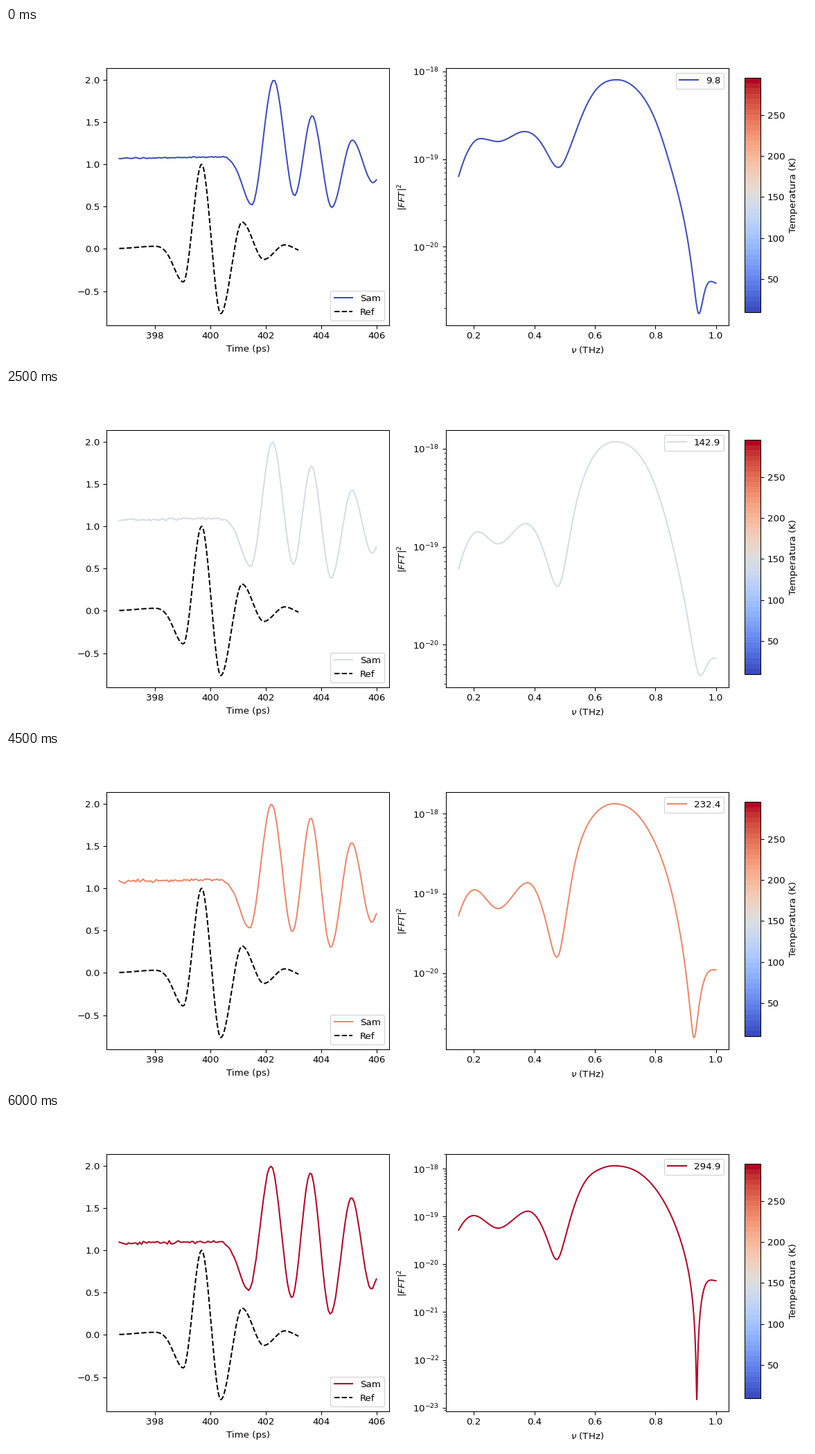
These frames come from a looping animation (1159x483 px, 6.5 s). A matplotlib script:

```python
import numpy as np
import matplotlib.pyplot as plt
from matplotlib.animation import FuncAnimation
from matplotlib.cm import ScalarMappable
from matplotlib.colors import Normalize

plt.rcParams["font.family"] = "DejaVu Sans"
DPI = 96.6
TEMPS = [9.8, 37.7, 64.9, 91.7, 117.6, 142.9, 166.2,
         188.8, 210.9, 232.4, 253.5, 274.3, 294.9]
LAST = len(TEMPS) - 1

# Sample pulse extrema: cold time, hot time, cold value, hot value
PULSE = np.array([
    (401.49, 401.38, .52, .53),
    (402.28, 402.18, 2, 2),
    (403.03, 402.93, .63, .44),
    (403.66, 403.60, 1.575, 1.914),
    (404.37, 404.32, .491, .242),
    (405.11, 405.08, 1.287, 1.624),
    (405.86, 405.80, .782, .536),
    (405.98, 405.98, .818, .66),
])

time = np.linspace(396.71, 405.98, 140)
nu = np.linspace(.15, 1, 851)


def along(i, points):
    return np.interp(i, list(points), list(points.values()))


def spline(x, y, slopes, xs):
    """Cubic spline; knots whose slope is nan get a continuous curvature."""
    x, y, slopes = (np.asarray(a, float) for a in (x, y, slopes))
    h = np.diff(x)
    d = np.diff(y) / h
    a, b = np.eye(len(x)), slopes.copy()
    for k in np.flatnonzero(np.isnan(slopes)):
        a[k, k - 1:k + 2] = 1 / h[k - 1], 2 / h[k - 1] + 2 / h[k], 1 / h[k]
        b[k] = 3 * (d[k - 1] / h[k - 1] + d[k] / h[k])
    m = np.linalg.solve(a, b)
    k = np.clip(np.searchsorted(x, xs, side="right") - 1, 0, len(h) - 1)
    s = (xs - x[k]) / h[k]
    return (y[k] + (y[k + 1] - y[k]) * s * s * (3 - 2 * s)
            + h[k] * s * (1 - s) * (m[k] * (1 - s) - m[k + 1] * s))


def extremes(i):
    """Highest and lowest log10 power, in units of 1e-18."""
    top = along(i, {0: -.094, 1: -.03, 5: .071, 9: .127, 12: .06})
    bottom = along(i, {0: -2.762, 3: -2.654, 5: -2.316, 7: -2.441,
                       9: -2.81, 10: -3.28, 11: -4.75, 12: -4.829})
    return top, bottom


def spectrum(i):
    """log10 power: a smooth envelope times two resonant dips."""
    warm = np.sin(np.pi / 2 * max(0, (i / LAST - .22) / .78))

    def mix(cold, hot):
        return cold + (hot - cold) * warm

    top, bottom = extremes(i)
    dip_nu = along(i, {0: .944, 3: .959, 9: .928, 12: .937})
    shift = dip_nu - .94
    notch_nu = mix(.479, .474)
    dips = [(notch_nu, mix(.045, .025)),
            (dip_nu, 10 ** ((bottom - .9 + 10 * shift) / 2))]

    def log_dips(v):
        return sum(np.log10((v - c) ** 2 + w * w) for c, w in dips)

    def log_dips_slope(v):
        return sum(2 * (v - c) / ((v - c) ** 2 + w * w) for c, w in dips) / np.log(10)

    start, bump, bump_nu = mix(-1.195, -1.285), mix(-.765, -.981), mix(.222, .2)
    knots = [
        (.15, start, 2 * (bump - start) / (bump_nu - .15)),
        (bump_nu, bump, 0),
        (.28, mix(-.799, -1.245), 0),
        (mix(.367, .379), mix(-.685, -.89), 0),
        (notch_nu, mix(-1.094, -1.9), 0),
        (.53, top - .66 - .22 * i / LAST, np.nan),
        (.57, top - .31, np.nan),
        (.61, top - .09, np.nan),
        (mix(.673, .662), top, 0),
        (.74 + .3 * shift, top - .12, np.nan),
        (.80 + .3 * shift, top - .47, np.nan),
        (.85 + .3 * shift, top - 1, np.nan),
        (dip_nu, bottom, 0),
        (1, along(i, {0: -2.413, 3: -2.489, 5: -2.138, 9: -1.961, 12: -2.344}), -.6),
    ]
    x, y, slopes = np.array(knots).T
    envelope = spline(x, y - log_dips(x), slopes - log_dips_slope(x), nu)
    return envelope + log_dips(nu)


def pulse(i):
    u = i / LAST
    t_cold, t_hot, v_cold, v_hot = PULSE.T
    t = t_cold + (t_hot - t_cold) * u
    v = v_cold + (v_hot - v_cold) * u
    base = 1.072 + .015 * u
    x = np.r_[time[0], t[0] + np.array([-1.08, -.83, -.47, -.22]), t]
    y = np.r_[base, base + .016, base - .015, .87, .635, v]
    slopes = np.r_[0, 0, [np.nan] * 3, np.zeros(7), .5]
    noise = np.random.default_rng(i + 5).normal(0, .004 + .005 * min(1, i / 3), time.size)
    noise *= np.where(time < t[0] - .9, 1, .5)
    return np.minimum(spline(x, y, slopes, time) + noise, 2)


def reference():
    x = [396.71, 398.0, 398.5, 398.75, 399.02, 399.68, 400.37,
         401.14, 401.92, 402.68, 403.17]
    y = [.005, .031, -.09, -.27, -.39, 1, -.765, .316, -.125, .048, -.015]
    slopes = [.005, 0, np.nan, np.nan, 0, 0, 0, 0, 0, 0, -.12]
    xs = np.linspace(x[0], x[-1], 300)
    return xs, spline(x, y, slopes, xs)


fig, (ax_t, ax_f) = plt.subplots(1, 2, figsize=(1159.01 / DPI, 483.01 / DPI), dpi=DPI)
cmap = plt.get_cmap("coolwarm", 45)
norm = Normalize(TEMPS[0], TEMPS[-1])
fig.colorbar(ScalarMappable(norm, cmap), cax=fig.add_axes([.92, .15, .02, .7]),
             label="Temperatura (K)")

sample, = ax_t.plot([], [], label="Sam")
ax_t.plot(*reference(), "k--", label="Ref")
ax_t.set(xlim=(396.2465, 406.4435), ylim=(-.90325, 2.13825), xlabel="Time (ps)")

power, = ax_f.semilogy([], [])
ax_f.set(xlim=(.1075, 1.0425), xlabel=r"$\nu$ (THz)", ylabel=r"$|FFT|^2$")


def update(i):
    color = cmap(norm(TEMPS[i]))
    sample.set_data(time, pulse(i))
    power.set_data(nu, 10 ** (spectrum(i) - 18))
    sample.set_color(color)
    power.set_color(color)
    power.set_label(f"{TEMPS[i]:.1f}")
    top, bottom = extremes(i)
    pad = .05 * (top - bottom)
    ax_f.set_ylim(10 ** (bottom - pad - 18), 10 ** (top + pad - 18))
    ax_t.legend(loc="lower right")
    ax_f.legend(loc="upper right")
    return sample, power


anim = FuncAnimation(fig, update, frames=len(TEMPS), interval=500,
                     init_func=lambda: update(0), repeat=True, repeat_delay=0)
plt.show()
```
